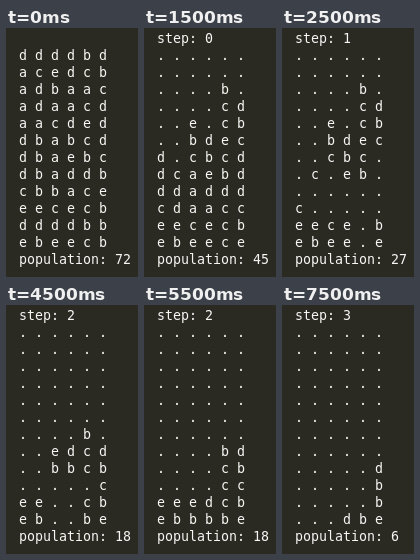
Animation of 132 by 249 pixels, one loop 8 s. Source, as an HTML page:

```html
<!DOCTYPE html>
<html lang="en">
<head>
<meta charset="utf-8">
<title>Falling blocks</title>
<style>
  html, body {
    margin: 0;
    width: 100%;
    height: 100%;
    overflow: hidden;
    background: #2a2922;
  }
  pre {
    position: absolute;
    left: 13px;
    top: 2px;
    margin: 0;
    color: #f6f7f4;
    font: 13.29px/17px "DejaVu Sans Mono", monospace;
    font-variant-ligatures: none;
  }
</style>
</head>
<body>
<pre id="screen"></pre>
<script>
const LOOP = 8000, FIRST = 500, HOLD = 1000;
const STEPS = 4, MIN_GROUP = 4, EMPTY = '.';

const start = `ddddbd acedcb adbaac adaacd aacded dbabcd
               dbaebc dbaddb cbbace eececb ddddbb ebeecb`
  .split(/\s+/).map(row => [...row]);

// Collects the cells of one colour connected to (r, c).
function groupAt(grid, r, c) {
  const group = [[r, c]], seen = new Set([`${r},${c}`]);
  for (const [y, x] of group) {
    for (const [ny, nx] of [[y - 1, x], [y + 1, x], [y, x - 1], [y, x + 1]]) {
      const key = `${ny},${nx}`;
      if (grid[ny]?.[nx] === grid[r][c] && !seen.has(key)) {
        seen.add(key);
        group.push([ny, nx]);
      }
    }
  }
  return group;
}

const clearGroups = grid => grid.map((row, r) => row.map((cell, c) =>
  cell !== EMPTY && groupAt(grid, r, c).length >= MIN_GROUP ? EMPTY : cell));

function fall(grid) {
  const columns = grid[0].map((_, c) =>
    grid.map(row => row[c]).filter(cell => cell !== EMPTY));
  return grid.map((row, r) => row.map((_, c) =>
    columns[c][r - grid.length + columns[c].length] ?? EMPTY));
}

function render(grid, title) {
  const population = grid.flat().filter(cell => cell !== EMPTY).length;
  return [title, ...grid.map(row => row.join(' ')), `population: ${population}`].join('\n');
}

const screens = [render(start, ' ')];
let grid = start;
for (let step = 0; step < STEPS; step++) {
  for (const move of [clearGroups, fall]) {
    grid = move(grid);
    screens.push(render(grid, `step: ${step}`));
  }
}

const screen = document.getElementById('screen');
const begin = performance.now();
let shown = -1;

function draw() {
  const t = (performance.now() - begin) % LOOP;
  const index = Math.floor((t - FIRST) / HOLD) + 1;
  if (index !== shown) {
    screen.textContent = screens[index];
    shown = index;
  }
  requestAnimationFrame(draw);
}
draw();
</script>
</body>
</html>
```
